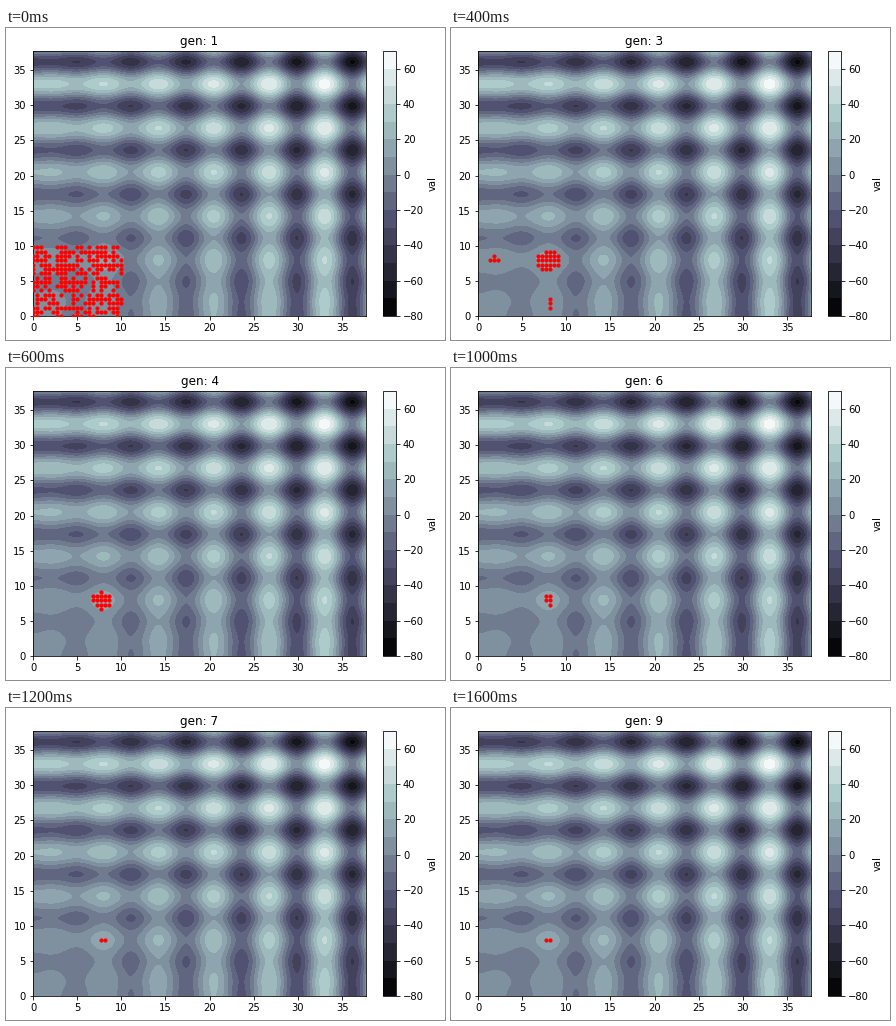
Animation of 439x312 px, one loop 1800 ms. Source, as a matplotlib script:

```python
import numpy as np
import matplotlib.pyplot as plt
from matplotlib.animation import FuncAnimation

W, H, DPI = 439, 312, 72
SPAN = 12 * np.pi

# One (cutoff, noise) pair per generation: selection grows stricter and surer.
SELECTION = [(-25, 100), (3.5, 2.5), (9, 1.2), (10.8, 0.8), (13.5, 0),
             (14.04, 0), (15, 0), (15, 0), (15, 0)]


def fitness(x, y):
    return x * np.sin(x) + y * np.sin(y)


def place(left, right, top=23.1, bottom=288.1):
    """Axes rectangle from pixel edges measured from the top left."""
    return [left / W, 1 - bottom / H, (right - left) / W, (bottom - top) / H]


# Candidates lie on a lattice; those whose noisy fitness passes are shown.
rng = np.random.default_rng(7)
gx, gy = np.meshgrid(np.arange(23) * 10 / 22, np.arange(17) * 0.61)
lattice = np.column_stack([gx.ravel(), gy.ravel()])
score = fitness(*lattice.T)
generations = [lattice[score + noise * rng.normal(size=score.size) > cutoff]
               for cutoff, noise in SELECTION]

plt.rcParams["font.family"] = "DejaVu Sans"
fig = plt.figure(figsize=((W + 0.001) / DPI, (H + 0.001) / DPI), dpi=DPI)
ax = fig.add_axes(place(27, 360))
cax = fig.add_axes(place(377, 390))

t = np.linspace(0, SPAN, 400)
x, y = np.meshgrid(t, t)
field = ax.contourf(x, y, fitness(x, y), levels=np.arange(-80, 71, 10),
                    cmap="bone")
fig.colorbar(field, cax=cax, ticks=range(-80, 61, 20), label="val")
ax.set_xlim(0, SPAN)
ax.set_ylim(0, SPAN)

dots = ax.scatter([], [], s=10, color="red", zorder=3)
title = ax.set_title("gen: 1")


def update(frame):
    dots.set_offsets(generations[frame])
    title.set_text(f"gen: {frame + 1}")
    return dots, title


anim = FuncAnimation(fig, update, frames=len(generations), interval=200,
                     repeat=True, repeat_delay=0)
plt.show()
```
